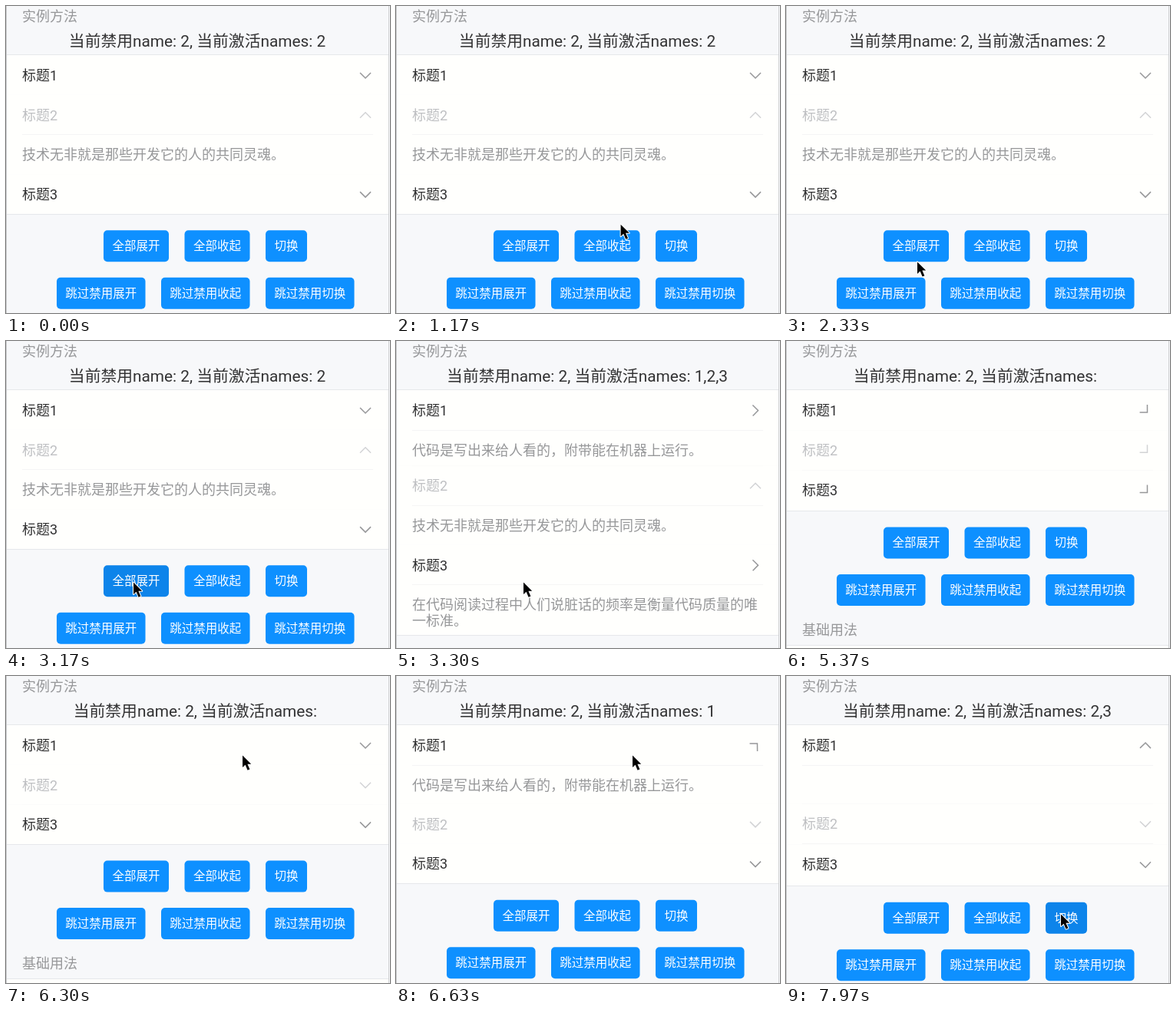
An HTML page with a canvas for the animation above (8 s loop, 500 by 400 pixels).

```html
<!DOCTYPE html>
<html lang="zh-CN">
<head>
<meta charset="utf-8">
<title>Collapse</title>
<style>
  html, body { margin: 0; width: 100%; height: 100%; overflow: hidden; background: #f7f8fa; }
  canvas { display: block; }
</style>
</head>
<body>
<canvas id="stage" width="500" height="400"></canvas>
<script>
const ctx = document.getElementById('stage').getContext('2d');
const LOOP = 8000, TOP = 64, ROW = 51.7, LINE = 21, LEFT = 21;
const OPEN_MS = 240, CLOSE_MS = 330;
const INK = '#323233', GRAY = '#969799', PALE = '#bfc0c3', RULE = '#f5f5f5', EDGE = '#e6e8eb';
const PAPER = '#fffffd', BLUE = '#0e90ff', BLUE_PRESSED = '#0d84ea';

// toggles: times at which a panel switches between closed and open
const panels = [
  { title: '标题1', text: ['代码是写出来给人看的，附带能在机器上运行。'],
    startOpen: false, toggles: [3180, 5124, 6450, 7969] },
  { title: '标题2', text: ['技术无非就是那些开发它的人的共同灵魂。'],
    startOpen: true, toggles: [5124, 7969], disabled: true },
  { title: '标题3', text: ['在代码阅读过程中人们说脏话的频率是衡量代码质量的唯', '一标准。'],
    startOpen: false, toggles: [3180, 5124, 7969] },
];

const activeNames = [[0, '2'], [3180, '1,2,3'], [5124, ''], [6450, '1'], [7960, '2,3']];

// label, x, y below the panels, width, press interval
const buttons = [
  ['全部展开', 127, 21.5, 85, 3030, 3230],
  ['全部收起', 232.5, 21.5, 85],
  ['切换', 338, 21.5, 54, 7930, 8000],
  ['跳过禁用展开', 66, 83, 115.5],
  ['跳过禁用收起', 202, 83, 115.5],
  ['跳过禁用切换', 338, 83, 115.5],
];

// time, x, y of the pointer tip
const pointerPath = [
  [0, 510, 350], [700, 500, 350], [1150, 300, 282], [1500, 177, 318], [1530, 177, 318],
  [1600, 172, 316], [1800, 172, 316], [2070, 172, 334], [2300, 172, 334], [2330, 171, 333],
  [2530, 166, 314], [3730, 166, 314], [4200, 174, 402], [5770, 92, 402], [6300, 308, 103],
  [6670, 308, 103], [7000, 352, 312], [7200, 352, 312], [7400, 358, 310], [LOOP, 358, 310],
];

const easeOut = p => 1 - (1 - p) ** 3.3;

function text(str, x, centerY, size, color, align = 'left') {
  ctx.font = `${size}px Roboto, "Noto Sans CJK SC", "Noto Sans CJK", sans-serif`;
  ctx.fillStyle = color;
  ctx.textAlign = align;
  ctx.fillText(str, x, centerY + size * 0.38);
}

function rect(x, y, w, h, color) {
  ctx.fillStyle = color;
  ctx.fillRect(x, y, w, h);
}

function panelState(panel, t) {
  const past = panel.toggles.filter(time => time <= t);
  const open = panel.startOpen !== (past.length % 2 === 1);
  const p = past.length
    ? Math.min(1, (t - past[past.length - 1]) / (open ? OPEN_MS : CLOSE_MS))
    : 1;
  return { open, height: open ? easeOut(p) : 1 - easeOut(p), turn: open ? p : 1 - p };
}

function chevron(y, turn, color) {
  ctx.save();
  ctx.translate(468, y);
  ctx.rotate(-Math.PI * turn);
  ctx.beginPath();
  ctx.moveTo(-7, -3.5);
  ctx.lineTo(0, 3.5);
  ctx.lineTo(7, -3.5);
  ctx.strokeStyle = color;
  ctx.lineWidth = 1.5;
  ctx.stroke();
  ctx.restore();
}

function drawPanel(panel, y, t, isLast) {
  const { open, height, turn } = panelState(panel, t);
  const bodyTop = y + ROW;
  const bodyHeight = height * (ROW + LINE * (panel.text.length - 1));
  const rule = ruleY => rect(LEFT, Math.round(ruleY), 457, 1, RULE);

  rect(1, y, 497, ROW + bodyHeight, PAPER);
  text(panel.title, LEFT, y + 26, 18, panel.disabled ? PALE : INK);
  chevron(y + 26.5, turn, panel.disabled ? '#d2d3d5' : GRAY);

  if (open) {
    ctx.save();
    ctx.beginPath();
    ctx.rect(0, bodyTop, 500, bodyHeight);
    ctx.clip();
    panel.text.forEach((line, i) => text(line, LEFT, bodyTop + 26 + i * LINE, 18, GRAY));
    ctx.restore();
  }
  if (!isLast || bodyHeight > LINE) rule(bodyTop);
  if (!isLast && bodyHeight > LINE) rule(bodyTop + bodyHeight);
  return bodyTop + bodyHeight;
}

function drawButton([label, x, offset, width, pressFrom, pressTo], bottom, t) {
  const y = bottom + offset;
  ctx.fillStyle = t >= pressFrom && t < pressTo ? BLUE_PRESSED : BLUE;
  ctx.beginPath();
  ctx.roundRect(x, y, width, 41, 5);
  ctx.fill();
  text(label, x + width / 2, y + 20, 15.5, '#fff', 'center');
}

function drawPointer(t) {
  const i = pointerPath.findIndex(key => key[0] > t);
  const [t0, x0, y0] = pointerPath[i - 1], [t1, x1, y1] = pointerPath[i];
  const p = (t - t0) / (t1 - t0);
  ctx.save();
  ctx.translate(x0 + (x1 - x0) * p, y0 + (y1 - y0) * p + 0.5);
  const arrow = new Path2D('M0 0V15.5L3.6 12.2L6.6 19.2L9.4 18L6.4 11.2H11.2Z');
  ctx.strokeStyle = '#fff';
  ctx.lineWidth = 2;
  ctx.lineJoin = 'round';
  ctx.stroke(arrow);
  ctx.fillStyle = '#000';
  ctx.fill(arrow);
  ctx.restore();
}

function draw(t) {
  rect(0, 0, 500, 400, '#f7f8fa');
  text('实例方法', LEFT, 13, 18, GRAY);
  const names = activeNames.filter(([time]) => time <= t).pop()[1];
  text(`当前禁用name: 2, 当前激活names: ${names}`, 249, 45.5, 20.8, INK, 'center');

  let bottom = TOP;
  panels.forEach((panel, i) => {
    bottom = drawPanel(panel, bottom, t, i === panels.length - 1);
  });
  rect(1, TOP - 1, 497, 1, EDGE);
  rect(1, Math.round(bottom), 497, 1, EDGE);

  buttons.forEach(button => drawButton(button, bottom, t));
  text('基础用法', LEFT, bottom + 155, 18, GRAY);
  rect(1, bottom + 176, 497, 400, PAPER);
  rect(1, Math.round(bottom + 176) - 1, 497, 1, EDGE);

  rect(0, 0, 1, 400, '#c4c5c7');
  rect(498, 0, 1, 400, '#cdced0');
  drawPointer(t);
}

const start = performance.now();
function tick() {
  draw((performance.now() - start) % LOOP);
  requestAnimationFrame(tick);
}
tick();
</script>
</body>
</html>
```
